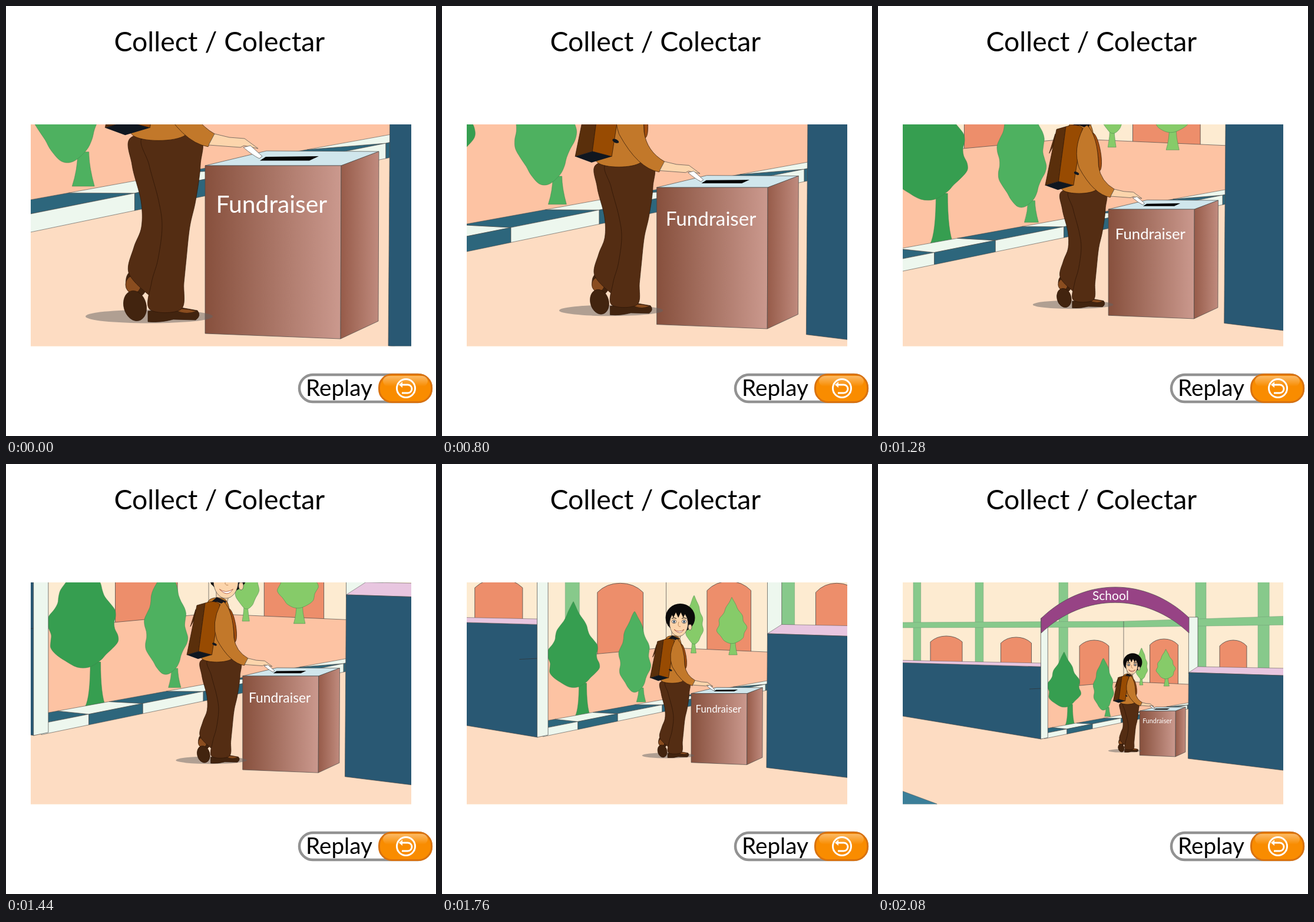
Write an HTML page that moves like this. It is 730 px wide and 730 px high and loops after 2160 ms.

```html
<!DOCTYPE html>
<html lang="en">
<head>
<meta charset="utf-8">
<title>Collect / Colectar</title>
<style>
html, body { margin: 0; width: 100%; height: 100%; overflow: hidden; background: #fff; }
svg { display: block; width: 100vw; height: 100vh; }
text { font-family: Lato, "Open Sans", sans-serif; }
#scene * { vector-effect: non-scaling-stroke; stroke-linejoin: round; }
</style>
</head>
<body>
<svg viewBox="0 0 730 730" xmlns="http://www.w3.org/2000/svg">
  <defs>
    <clipPath id="view"><rect x="42" y="201" width="646" height="376.5"/></clipPath>
    <linearGradient id="front"><stop stop-color="#87503d"/><stop offset="1" stop-color="#cb998e"/></linearGradient>
    <linearGradient id="side"><stop stop-color="#965b49"/><stop offset="1" stop-color="#c08b7e"/></linearGradient>
    <linearGradient id="shine" x2="0" y2="1">
      <stop stop-color="#fff" stop-opacity=".4"/><stop offset="1" stop-color="#fff" stop-opacity="0"/>
    </linearGradient>
  </defs>
  <rect width="730" height="730" fill="#fff"/>
  <text x="183.5" y="76.5" font-size="46.4">Collect / Colectar</text>
  <g clip-path="url(#view)"><g id="scene"></g></g>
  <rect x="498" y="626" width="224" height="46" rx="23" fill="#fff" stroke="#929292" stroke-width="4.5"/>
  <text x="509" y="662" font-size="38.7">Replay</text>
  <rect x="633.5" y="625.5" width="89" height="47" rx="22" fill="#f98c00" stroke="#d9720f" stroke-width="3"/>
  <rect x="640" y="628" width="76" height="18" rx="9" fill="url(#shine)"/>
  <g fill="none" stroke="#fff" stroke-width="3">
    <circle cx="679" cy="649" r="15.5"/>
    <path d="M672 643H682a7 7 0 0 1 0 14H672"/>
    <path d="M667 643l6 -5v10Z" fill="#fff" stroke="none"/>
  </g>
</svg>
<script>
const scene = document.getElementById('scene');
const CX = 482.4, CY = 472.4;
const STEP = 80, FRAMES = 27;
const LINE = '#4a4a48', NAVY = '#295873', TEAL = '#2d667c', PALE = '#edf7ee';
const GREEN = '#87c98b', PINK = '#e8c6e0', PEACH = '#fddcc2', SKIN = '#fcd5ac', INK = '#2b1507';

const zoomAt = n => 1 - 0.0368 * n;
const around = k => `translate(${CX} ${CY}) scale(${k}) translate(${-CX} ${-CY})`;

// Shapes inside a layer use the coordinates seen after n zoom steps.
const layer = (n, ...parts) => `<g transform="${around(1 / zoomAt(n))}">${parts.join('')}</g>`;

const path = (d, fill = 'none', stroke = 'none', w = 0.7) =>
  `<path d="${d}" fill="${fill}" stroke="${stroke}" stroke-width="${w}"/>`;
const poly = (pts, ...style) => path(`M${pts}Z`, ...style);
const oval = (x, y, rx, ry, fill, stroke = 'none', turn = 0) =>
  `<ellipse cx="${x}" cy="${y}" rx="${rx}" ry="${ry}" fill="${fill}" stroke="${stroke}" stroke-width=".7" transform="rotate(${turn} ${x} ${y})"/>`;
const label = (x, y, size, str) => `<text x="${x}" y="${y}" font-size="${size}" fill="#fff">${str}</text>`;

// Smooth closed outline from rows of [y, left, right].
function profile(rows, ...style) {
  const p = [...rows.map(([y, , r]) => [r, y]), ...rows.map(([y, l]) => [l, y]).reverse()];
  const at = i => p[(i + p.length) % p.length];
  let d = `M${p[0]}`;
  p.forEach((a, i) => {
    const b = at(i + 1), prev = at(i - 1), next = at(i + 2);
    const c1 = a.map((v, j) => v + (b[j] - prev[j]) / 6);
    const c2 = b.map((v, j) => v - (next[j] - a[j]) / 6);
    d += `C${c1} ${c2} ${b}`;
  });
  return path(d + 'Z', ...style);
}

// Lumpy egg of leaves on a flared trunk.
function tree({ x, top, bottom, half, taper, trunk, foot, fill, seed }) {
  const edge = '#3f7f48', w = half * 0.3, rows = [];
  for (let i = 0; i <= 18; i++) {
    const t = 0.01 + 0.98 * i / 18;
    const r = half * Math.sin(Math.PI * t ** taper) ** 0.6;
    const lump = phase => 1 + 0.08 * Math.sin(t * 24 + phase);
    rows.push([top + (bottom - top) * t, x - r * lump(seed), x + r * lump(seed + 2)]);
  }
  const stem = `M${trunk - w / 2} ${bottom - 8}Q${trunk - w / 2} ${foot - 12} ${trunk - w} ${foot}` +
    `h${w * 2}Q${trunk + w / 2} ${foot - 14} ${trunk + w / 2} ${bottom - 8}Z`;
  return path(stem, fill, edge, 0.5) + profile(rows, fill, edge, 0.5);
}

function building() {
  const beams = [60, 165, 307, 539, 645].map(x => path(`M${x} 0h${12 + x / 90}V400H${x}Z`, GREEN, '#6f9a74', 0.5));
  const doors = [[116, 292], [234.5, 294], [367, 299], [485.5, 297], [603, 299]].map(([x, top]) => {
    const h = 28 - x / 120;
    return path(`M${x - h} 385V${top + 10}Q${x - h * 0.6} ${top} ${x} ${top}T${x + h} ${top + 10}V385Z`, '#ed8e6b', LINE, 0.8);
  });
  return layer(20,
    path('M-2000-2000H3000V2000H-2000Z', '#fdebd1'), ...beams,
    path('M30 269L417 267L700 258v15L417 277L30 278Z', GREEN, '#6f9a74', 0.5),
    path('M417 267V380', 'none', LINE), ...doors);
}

const plaza = () => layer(12, path('M20 284L344 254L640 267V470H20Z', '#fdc3a3', LINE));

function trees() {
  const light = '#86cb69';
  return layer(16,
    tree({ x: 428, top: 223, bottom: 306, half: 15, taper: 1.5, trunk: 427, foot: 321, fill: light, seed: 1 }),
    tree({ x: 492, top: 226, bottom: 305, half: 24, taper: 1.8, trunk: 494, foot: 324, fill: light, seed: 3 }),
    tree({ x: 223, top: 233, bottom: 380, half: 43, taper: 1.8, trunk: 239, foot: 428, fill: '#369e50', seed: 0 }),
    tree({ x: 327, top: 250, bottom: 388, half: 26, taper: 1.4, trunk: 338, foot: 404, fill: '#4eb160', seed: 2 }));
}

// Kerb with alternating stripes on its top and its face.
function curb() {
  const line = (y, k) => x => y - k * (x - 42);
  const back = line(370, 0.1813), edge = line(391, 0.1989), low = line(417, 0.2075);
  const at = i => 117 + 142 * i + 8 * i * i;
  const behind = x => x - 78 - 0.05 * x;
  let out = '';
  for (let i = -2; i < 4; i++) {
    const a = at(i), b = at(i + 1), c = behind(a), d = behind(b);
    const [top, face] = i % 2 ? [PALE, TEAL] : [TEAL, PALE];
    out += poly([c, back(c), d, back(d), b, edge(b), a, edge(a)], top, LINE, 0.6);
    out += poly([a, edge(a), b, edge(b), b, low(b), a, low(a)], face, LINE, 0.6);
  }
  return layer(5, out);
}

const ground = () => layer(20,
  path('M30 426L278 467L528 415H700V600H30Z', PEACH),
  path('M30 551L100 577V600H30Z', '#3b7f99', LINE, 0.5));

function gate() {
  const arch = 'M277 262C350 191.5 455 191.5 528 261V287C455 218 350 218 277 287Z';
  return layer(20,
    path('M30 337L277 344V467L30 426Z', NAVY, LINE),
    path('M30 333L277 338v6L30 337Z', PINK, LINE, 0.5),
    path('M257 382l20-1', 'none', '#333'),
    path('M276.4 262L288.3 255V464.5L276.4 467Z', PALE, LINE),
    path('M527.4 260H543V350L527.4 356Z', PALE, LINE),
    path('M527.4 354L543 344L700 347V359.5Z', PINK, LINE, 0.5),
    path('M527.4 354L700 359.5V521.5L526.4 500Z', NAVY, LINE),
    path(arch, '#974385', LINE),
    label(364, 231, 21, 'School'));
}

const box = () => layer(0,
  path('M338 271L442 246L633 247L569 271Z', '#d0e6ec', LINE),
  path('M441 256L531 255L515 262.5H431Z', '#050505'),
  path('M338 271H569L568 565L338 556Z', 'url(#front)', LINE),
  path('M569 271L633 247L632 535L568 565Z', 'url(#side)', LINE),
  label(356.5, 351, 40.8, 'Fundraiser'),
  oval(243, 527, 108, 11.5, 'rgba(100,100,100,.5)'));

function legs() {
  const cloth = '#542d13', shoe = '#42240f', tan = '#8a4d1f';
  return layer(0,
    oval(221, 471, 17, 23, shoe, INK, -15),
    oval(216, 473, 13, 15, tan, INK),
    oval(219, 509, 19, 26, shoe, INK, -15),
    profile([[222, 214, 300], [270, 214, 300], [330, 229, 285], [375, 230, 270], [410, 217, 270], [452, 208, 256], [486, 237, 246]], cloth, INK),
    path('M241 536V518L297 512L325 517Q332 526 322 533L284 532Q262 538 241 536Z', shoe, INK),
    path('M286 515Q304 513 322 518Q304 525 286 515Z', tan),
    profile([[221, 234, 326], [270, 243, 330], [330, 259, 322], [375, 265, 312], [430, 258, 306], [470, 247, 302], [515, 244, 297]], cloth, INK));
}

function head() {
  const hair = '#0c0a0a';
  const eye = x => oval(x, 267.5, 3.7, 3, '#fff', INK) + oval(x, 267.7, 1.7, 2.1, '#344858') +
    path(`M${x - 4} 262.5q4-3 8 0`, 'none', hair, 1);
  let fringe = 'M384 276Q376 238 404 240Q428 244 421 274';
  for (let i = 0; i < 8; i++) fringe += `L${418 - i * 4.2} ${i % 2 ? 252 : 261}`;
  return layer(16,
    path('M390 282L406 288L403 300H390Z', SKIN, LINE),
    oval(404.5, 261, 25, 24, hair),
    oval(421, 277, 3, 5, SKIN, LINE),
    oval(402, 271, 15.5, 21.5, SKIN, LINE),
    path(fringe + 'Z', hair),
    eye(394), eye(411),
    path('M402 268q-3 9 3 8', 'none', '#a56a3c'),
    path('M394 281q8 6 17 0q-7 11-17 0Z', '#fff', '#a5452d', 0.8));
}

function torso() {
  const coat = '#c2782a', side = '#5a2f0b';
  return layer(12,
    oval(383, 274, 7, 29, '#a04c0e', INK, -10),
    profile([[230, 346, 372], [255, 338, 381], [290, 334, 387], [331, 333, 383]], coat, INK),
    path('M345 237L358 226L374 233L371 239L358 234Z', '#15161c'),
    path('M322 247l-9 29l11-20Z', side, INK),
    path('M324 240L338 236L327 318L307 324Z', side, INK),
    path('M338 236Q354 230 363 238L349.5 324L327 318Q332 280 338 236Z', '#984b02', INK),
    path('M307 324L327 318L349.5 324L326 331Z', '#101720'),
    oval(354, 306, 4, 2, '#101720', 'none', 25),
    path('M364 238Q348 270 358 298Q380 338 404.6 342L411 330Q390 318 387 295Q386 250 370 234', coat, INK));
}

const hand = () => layer(0,
  path('M354 217L379 223L405 225L428 242L404 237L398 240L344 236Z', SKIN, LINE),
  path('M403 240L415 237L435 255L430 259Q418 253 403 240Z', '#fff', LINE));

scene.innerHTML = [building, plaza, trees, ground, curb, gate, box, legs, head, torso, hand]
  .map(part => part()).join('');

// The camera holds, then pulls back evenly with one short pause.
function draw(ms) {
  const f = Math.floor(ms / STEP) % FRAMES;
  const n = Math.max(0, f - 5 - (f > 12 ? 1 : 0));
  scene.setAttribute('transform', around(zoomAt(n)));
}

let start;
function tick(now) {
  start ??= now;
  draw(Math.max(0, now - start));
  requestAnimationFrame(tick);
}
draw(0);
requestAnimationFrame(tick);
</script>
</body>
</html>
```
